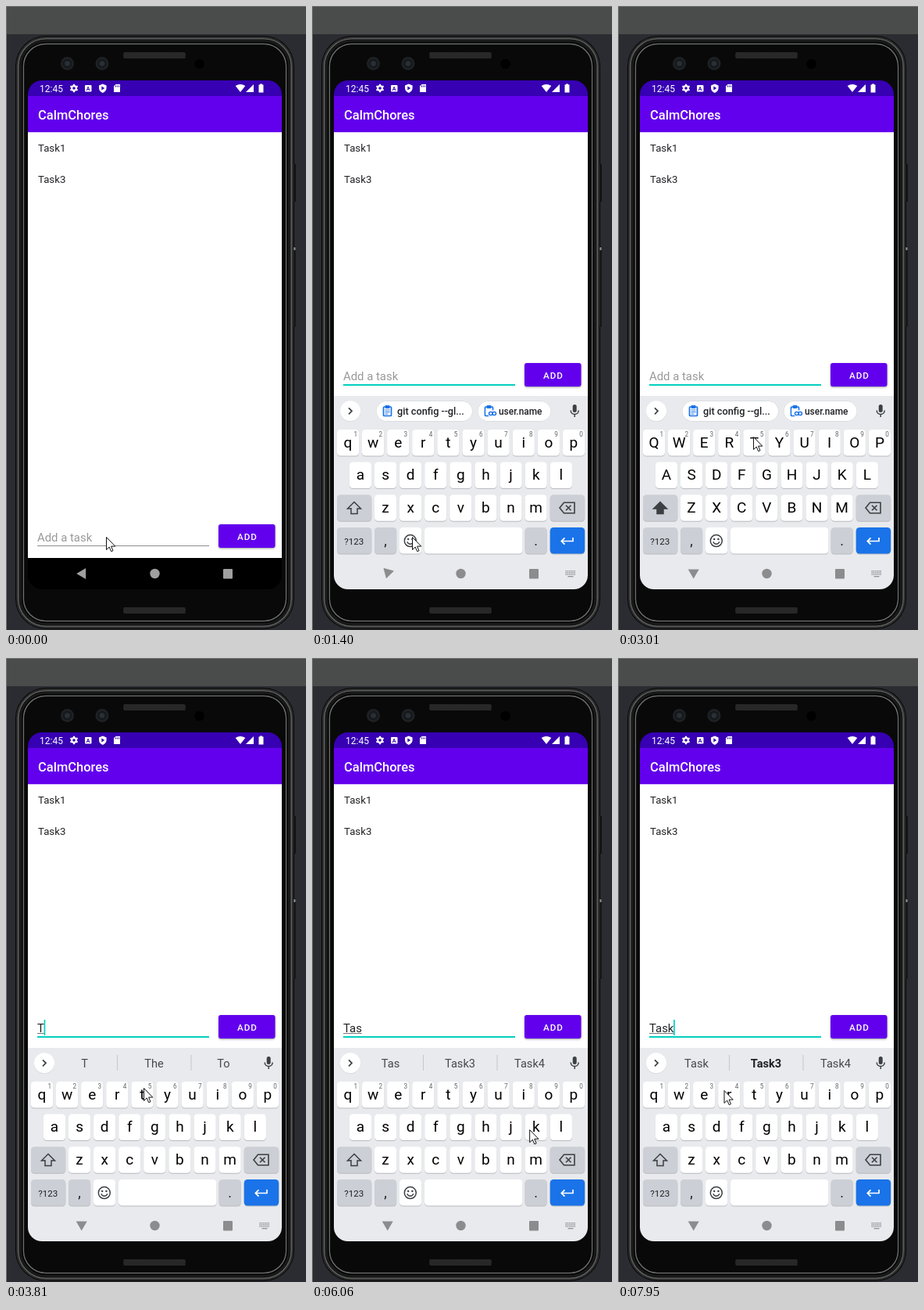
An HTML page with a canvas for the animation above (8000 ms loop, 384 by 797 pixels).

```html
<!DOCTYPE html>
<html lang="en">
<head>
<meta charset="utf-8">
<title>To-do list on a phone</title>
<style>
html, body { margin: 0; width: 100%; height: 100%; overflow: hidden; background: #2b2c31; }
canvas { display: block; width: 384px; height: 797px; }
</style>
</head>
<body>
<canvas id="stage"></canvas>
<script>
const W = 384, H = 797, LOOP = 8000;
const canvas = document.getElementById('stage');
const ctx = canvas.getContext('2d');
const dpr = window.devicePixelRatio || 1;
canvas.width = W * dpr;
canvas.height = H * dpr;

const INK = '#202124', ICON = '#3c4043', PANEL = '#e8eaed', TEAL = '#03cfc0', BLUE = '#1a73e8';
const PITCH = 32.1, KEY_W = 28.2, KEY_H = 33.5;
const ROWS = [541, 582.5, 624.3, 666];

// Pointer path: [time, x, y]
const PATH = [
  [0, 128, 678], [1500, 128, 678], [1970, 55, 640], [2270, 55, 640],
  [2860, 173, 550], [3440, 173, 550], [3700, 176, 549], [3930, 176, 549],
  [4200, 62, 598], [5000, 62, 598], [5330, 93.5, 594], [5670, 93.5, 594],
  [6150, 296.5, 603], [7020, 296.5, 603], [7950, 135.5, 552]
];
const CARET_ON = [
  [410, 990], [1830, 2270], [2560, 3000], [3440, 4700], [5000, 5400],
  [5670, 6060], [6590, 7020], [7480, 8000]
];
// Pressed keys: [start, end, letter, centre x, key top]
const PRESSES = [
  [3160, 3440, 'T', 46 + PITCH * 4, ROWS[0]], [4700, 5000, 'a', 62, ROWS[1]],
  [5520, 5670, 's', 62 + PITCH, ROWS[1]], [6190, 6590, 'k', 62 + PITCH * 7, ROWS[1]]
];
// Typed text and suggestions: [start, text, suggestions]
const TYPED = [
  [0, '', null], [3440, 'T', ['T', 'The', 'To']], [5000, 'Ta', ['Ta', 'Task3', 'Task4']],
  [5670, 'Tas', ['Tas', 'Task3', 'Task4']], [6590, 'Task', ['Task', 'Task3', 'Task4']]
];

const within = (t, [a, b]) => t >= a && t < b;
const progress = (t, a, b) => Math.min(1, Math.max(0, (t - a) / (b - a)));
const smooth = p => p * p * (3 - 2 * p);

function box(x, y, w, h, r, color) {
  ctx.beginPath();
  ctx.roundRect(x, y, w, h, r);
  ctx.fillStyle = color;
  ctx.fill();
}

function ring(x, y, w, h, r, color, width) {
  ctx.beginPath();
  ctx.roundRect(x, y, w, h, r);
  ctx.strokeStyle = color;
  ctx.lineWidth = width;
  ctx.stroke();
}

function disc(x, y, r, color) {
  ctx.beginPath();
  ctx.arc(x, y, r, 0, Math.PI * 2);
  ctx.fillStyle = color;
  ctx.fill();
}

function shape(d, x, y, fill, stroke, width = 1.5) {
  const p = new Path2D(d);
  ctx.save();
  ctx.translate(x, y);
  if (fill) { ctx.fillStyle = fill; ctx.fill(p); }
  if (stroke) { ctx.strokeStyle = stroke; ctx.lineWidth = width; ctx.stroke(p); }
  ctx.restore();
}

function text(s, x, y, size, color, align = 'left', weight = 400, spacing = 0) {
  ctx.font = `${weight} ${size}px Roboto, sans-serif`;
  ctx.letterSpacing = spacing + 'px';
  ctx.textAlign = align;
  ctx.fillStyle = color;
  ctx.fillText(s, x, y);
  ctx.letterSpacing = '0px';
}

function grille(y) {
  box(150, y, 80, 8, 2, '#202020');
  ctx.fillStyle = '#3f3f3f';
  for (let r = 0; r < 4; r++)
    for (let x = 151 + r % 2; x < 229; x += 2) ctx.fillRect(x, y + r * 2 + 0.5, 1, 1);
}

function lens(x) {
  disc(x, 73.5, 8.5, '#1f2225');
  disc(x, 73.5, 6, '#16191c');
  disc(x, 73.5, 3.3, '#292f36');
}

// Outline of the phone, drawn d pixels inside its edge
function rim(d, color, width) {
  ring(12 + d, 38 + d, 357 - 2 * d, 758 - 2 * d, 39 - d, color, width);
}

function phone() {
  ctx.fillStyle = '#2b2c31';
  ctx.fillRect(0, 0, W, H);
  ctx.fillStyle = '#4a4c4c';
  ctx.fillRect(0, 0, W, 36);
  ctx.fillStyle = '#737574';
  ctx.fillRect(0, 0, W, 1);
  ctx.fillRect(0, 0, 1, H);
  box(12, 38, 357, 758, 39, '#060606');
  rim(2, '#2c2c2c', 2);
  rim(3.8, '#5e5f5f', 1.6);
  rim(6.5, '#191919', 3);
  rim(10.5, '#6c6d6d', 1.5);
  box(23.5, 49.5, 334, 735, 27, '#090909');
  box(368, 202, 3, 48, 1, '#131313');
  box(368, 307, 3, 103, 1, '#181818');
  box(368.5, 308, 2, 4, 1, '#999');
  grille(59);
  grille(768);
  lens(78.5);
  lens(123);
  disc(247.5, 74, 6.3, '#000');
}

function statusBar() {
  ctx.fillStyle = '#3700b3';
  ctx.fillRect(28, 95, 325, 20);
  text('12:45', 43, 109.5, 12, '#fff');
  // gear
  ctx.strokeStyle = '#fff';
  ctx.lineWidth = 2.2;
  for (let i = 0; i < 6; i++) {
    const a = i * Math.PI / 3 + Math.PI / 6;
    ctx.beginPath();
    ctx.moveTo(87 + Math.cos(a) * 3, 105 + Math.sin(a) * 3);
    ctx.lineTo(87 + Math.cos(a) * 5.3, 105 + Math.sin(a) * 5.3);
    ctx.stroke();
  }
  disc(87, 105, 4, '#fff');
  disc(87, 105, 1.8, '#3700b3');
  box(101, 101, 8.5, 8.5, 1, '#fff');
  text('A', 105.2, 108, 7, '#3700b3', 'center', 700);
  shape('M0-5.5L4.8-3.6V0C4.8 3 2.5 5 0 6C-2.5 5-4.8 3-4.8 0V-3.6Z', 123.8, 105, '#fff');
  shape('M-1.5-2.5L2.5 0L-1.5 2.5Z', 123.8, 105, '#3700b3');
  shape('M-1.5-5H4V5H-4V-2.5Z', 142, 105, '#fff');
  shape('M-1.5-3.5V-1.5M.5-3.5V-1.5M2.5-3.5V-1.5', 142, 105, null, '#3700b3', 1);
  shape('M-6.3-3Q0-7 6.3-3L0 5Z', 300, 105, '#fff');
  shape('M5-5V5H-5Z', 312, 105, '#fff');
  shape('M-1.5-5.5H1.5V-4.5H3V5.5H-3V-4.5H-1.5Z', 326.5, 105, '#fff');
}

function addButton() {
  ctx.save();
  ctx.shadowColor = 'rgba(0, 0, 0, .4)';
  ctx.shadowBlur = 2.5 * dpr;
  ctx.shadowOffsetY = dpr;
  box(272, 662, 72.5, 30, 3, '#6200ee');
  ctx.restore();
  text('ADD', 309, 681.5, 11.6, '#fff', 'center', 500, 1.03);
}

function app(t, typed) {
  const lift = t >= 990 ? 206 : 0;
  ctx.fillStyle = '#fff';
  ctx.fillRect(28, 161, 325, 544);
  statusBar();
  ctx.fillStyle = '#6200ee';
  ctx.fillRect(28, 115, 325, 46.2);
  text('CalmChores', 41, 145, 16.5, '#fff', 'left', 500);
  text('Task1', 41, 186, 13.24, INK);
  text('Task3', 41, 226, 13.24, INK);

  ctx.save();
  ctx.translate(0, -lift);
  ctx.fillStyle = t < 410 ? '#8c8c8c' : TEAL;
  ctx.fillRect(40, 689, 220, t < 410 ? 1 : 2);
  let caretX = 40;
  if (typed) {
    text(typed, 40, 683.5, 14.9, INK);
    const w = ctx.measureText(typed).width;
    ctx.fillStyle = '#777';
    ctx.fillRect(40, 685, w, 1);
    caretX += w;
  } else {
    text('Add a task', 40, 683.5, 14.9, '#999');
  }
  if (CARET_ON.some(span => within(t, span))) {
    ctx.fillStyle = TEAL;
    ctx.fillRect(caretX - 0.3, 668, 1.7, 20);
  }
  addButton();
  ctx.restore();
}

function key(x, y, w, color = '#fff') {
  box(x, y + 1, w, KEY_H, 4.5, '#b9bbc0');
  box(x, y, w, KEY_H, 4.5, color);
}

function letterRow(letters, x, y, upper) {
  [...letters].forEach((c, i) => {
    const cx = x + i * PITCH;
    key(cx - KEY_W / 2, y, KEY_W);
    text(upper ? c.toUpperCase() : c, cx, y + 22.7, 19, '#000', 'center');
  });
}

function clipChip(x, w, label, size) {
  ring(x, 505, w, 25, 12.5, '#d0d2d6', 1);
  box(x, 505, w, 25, 12.5, '#fff');
  ring(x + 9, 512, 10, 11.5, 1, BLUE, 1.7);
  box(x + 11, 510, 6, 4, 1, BLUE);
  shape('M0 0H6M0 2.5H6M0 5H4', x + 11, 516, null, BLUE, 1.2);
  text(label, x + 26.5, 522, size, INK, 'left', 500);
}

function suggestions(words) {
  disc(49, 518, 13, '#d3d5d8');
  disc(49, 517.3, 13, '#fff');
  shape('M-2-4L2 0L-2 4', 49, 517.3, null, ICON, 1.7);
  if (words) {
    ctx.fillStyle = '#c4c7cb';
    ctx.fillRect(142, 507, 1, 20);
    ctx.fillRect(236.5, 507, 1, 20);
    words.forEach((word, i) => {
      const bold = i === 1 && words[0] === 'Task';
      text(word, [100.5, 189.5, 278.5][i], 523, 14.6, bold ? INK : '#45484c', 'center', bold ? 700 : 400);
    });
  } else {
    clipChip(82.5, 122.5, 'git config --gl...', 12.7);
    clipChip(212.5, 93, 'user.name', 11.9);
    box(222.5, 515, 8, 7, 0, '#fff');
    box(226, 516.5, 10, 8, 0, '#fff');
    ring(226.5, 518.5, 4.5, 4, 2, BLUE, 1.4);
    ring(231, 518.5, 4.5, 4, 2, BLUE, 1.4);
  }
  box(333.7, 509, 5, 10, 2.5, ICON);
  shape('M-5-1.5C-5 5.2 5 5.2 5-1.5M0 3.5V7', 336.2, 518, null, ICON, 1.5);
}

function keyboard(t, words) {
  const upper = t >= 2270 && t < 3440;
  ctx.fillStyle = PANEL;
  ctx.fillRect(28, 498, 325, 247);
  suggestions(words);
  letterRow('qwertyuiop', 46, ROWS[0], upper);
  for (let i = 0; i < 10; i++) text((i + 1) % 10, 55.7 + i * PITCH, 550, 8.2, '#5f6368', 'center');
  letterRow('asdfghjkl', 62, ROWS[1], upper);
  letterRow('zxcvbnm', 94, ROWS[2], upper);

  const gray = '#cccfd5', low = ROWS[3];
  key(32, ROWS[2], 44.3, gray);
  shape('M0-8L8.5 .5H4V7H-4V-.5V.5H-8.5Z', 54, 641.5, upper ? ICON : null, ICON, 1.5);
  key(304.7, ROWS[2], 44.5, gray);
  shape('M-9.5 0L-4-6.8H9.5V6.8H-4ZM-1.5-3.3L5 3.3M5-3.3L-1.5 3.3', 326.5, 641, null, ICON, 1.6);

  key(32, low, 44.3, gray);
  text('?123', 53.8, 687.5, 11.6, INK, 'center');
  key(80, low, KEY_W, gray);
  text(',', 94, 689, 18, INK, 'center');
  key(112, low, KEY_W);
  ring(118.3, 675.6, 15, 15, 7.5, ICON, 1.5);
  disc(123.2, 681, 1.2, ICON);
  disc(128.4, 681, 1.2, ICON);
  shape('M-4 1.2C-2.5 5.2 2.5 5.2 4 1.2', 125.8, 683, null, ICON, 1.4);
  key(144, low, 125.5);
  key(272.6, low, KEY_W, gray);
  text('.', 286.7, 689, 18, INK, 'center');
  key(304.7, low, 44.5, BLUE);
  shape('M7.5-4V.5H-7M-3-3.7L-7.2 .5L-3 4.7', 326.5, 683, null, '#fff', 1.7);

  // keyboard switcher
  ctx.fillStyle = '#8f9194';
  for (let r = 0; r < 3; r++)
    for (let i = 0; i < 6; i++) ctx.fillRect(324.5 + i * 2.2, 721 + r * 2.2, 1.4, 1.4);
  ctx.fillRect(327.5, 728, 7, 1.3);

  for (const [a, b, c, cx, y] of PRESSES) {
    if (!within(t, [a, b])) continue;
    box(cx - 16.3, y - 40, 32.6, 76.5, 6, '#c3c5c9');
    box(cx - 15.5, y - 41, 31, 76, 6, '#fff');
    text(c, cx, y - 13, 24, '#000', 'center');
  }
}

function navIcons(t) {
  const color = t < 990 ? '#a0a0a0' : '#8c8c8e';
  ctx.save();
  ctx.translate(96.7, 725);
  ctx.rotate(-Math.PI / 2 * smooth(progress(t, 1180, 1480)));
  shape('M-6.5 0L5.5-7V7Z', 0, 0, color);
  ctx.restore();
  disc(190.5, 725, 6.2, color);
  box(278, 719, 12, 12.5, 1, color);
}

function pointer(t) {
  let i = 0;
  while (i < PATH.length - 2 && t >= PATH[i + 1][0]) i++;
  const [t0, x0, y0] = PATH[i], [t1, x1, y1] = PATH[i + 1];
  const p = smooth(progress(t, t0, t1));
  shape('M.5 .5V16.5L4.2 13L6.7 18.7L9 17.7L6.6 12.1H11.8Z',
    x0 + (x1 - x0) * p, y0 + (y1 - y0) * p, '#fff', '#111', 1);
}

function draw(t) {
  const [, typed, words] = TYPED.filter(s => t >= s[0]).pop();
  ctx.setTransform(dpr, 0, 0, dpr, 0, 0);
  phone();
  ctx.save();
  ctx.beginPath();
  ctx.roundRect(28, 95, 325, 650, 18);
  ctx.clip();
  app(t, typed);
  ctx.fillStyle = '#000';
  ctx.fillRect(28, 705, 325, 40);
  if (t >= 990) {
    const rise = 1 - (1 - progress(t, 940, 1270)) ** 2;
    ctx.save();
    ctx.translate(0, 247 * (1 - rise));
    keyboard(t, words);
    ctx.restore();
  }
  navIcons(t);
  ctx.restore();
  pointer(t);
}

const start = performance.now();
function tick() {
  draw((performance.now() - start) % LOOP);
  requestAnimationFrame(tick);
}
tick();
</script>
</body>
</html>
```
